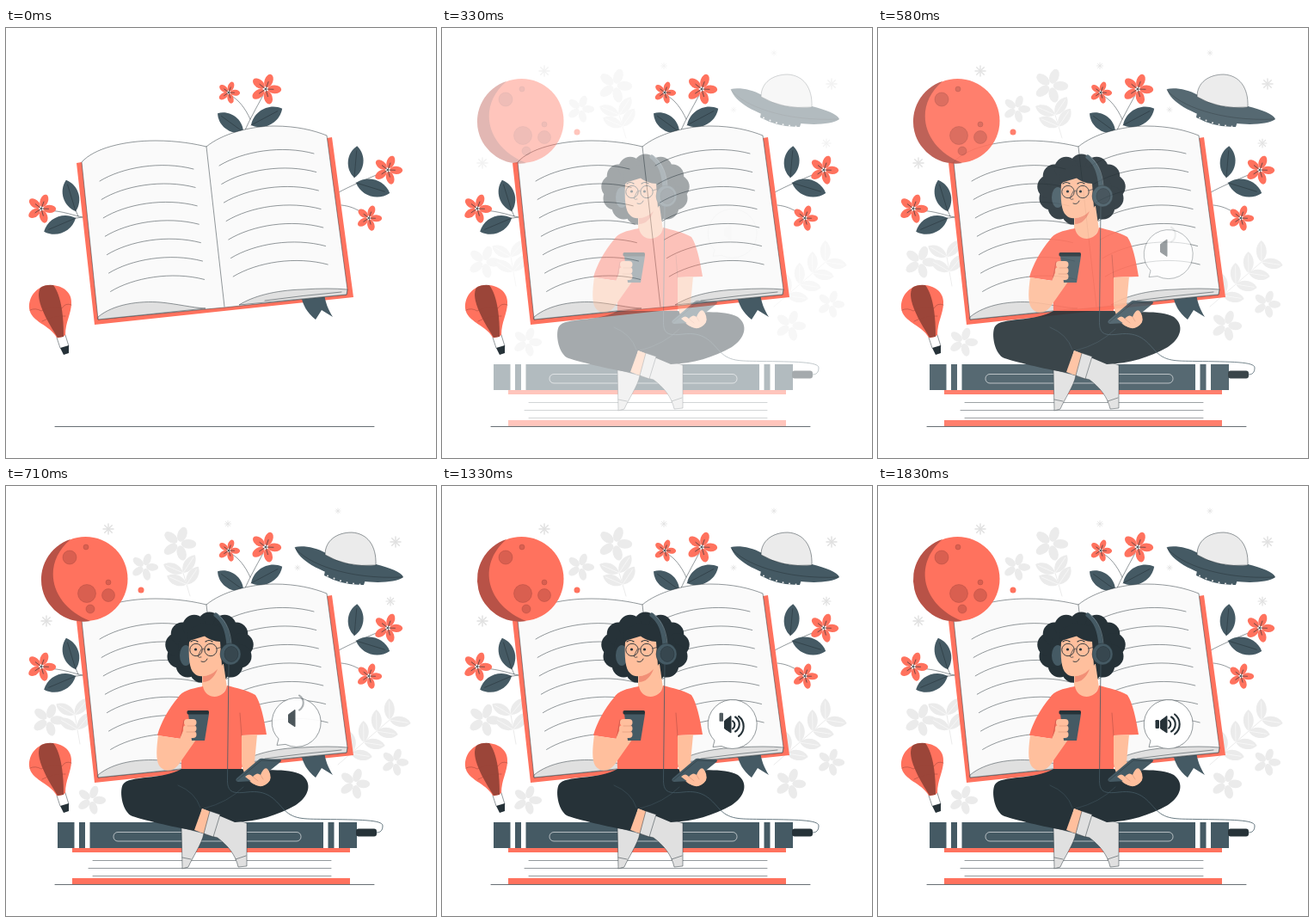
Animation, 500 px wide and 500 px high, one loop 1.87 s. Source, as an HTML page:

```html
<!DOCTYPE html>
<html lang="en">
<head>
<meta charset="utf-8">
<title>Reading and listening</title>
<style>
html, body { margin: 0; width: 100%; height: 100%; overflow: hidden; background: #fff; }
svg { display: block; width: 100vw; height: 100vh; }
</style>
</head>
<body>
<svg id="stage" viewBox="0 0 500 500"></svg>
<script>
const CORAL = '#ff725e', RUST = '#a84a40', SLATE = '#455a64', INK = '#263238', SKIN = '#ffbf9d', PALE = '#ebebeb', GREY = '#e0e0e0';

const path = (d, fill, extra = '') => `<path d="${d}" fill="${fill}" ${extra}/>`;
const line = (d, width = 0.5, color = INK) =>
  path(d, 'none', `stroke="${color}" stroke-width="${width}" stroke-linecap="round" stroke-linejoin="round"`);
const thin = `stroke="${INK}" stroke-width=".5"`;
const oval = (x, y, rx, ry, fill, extra = '') =>
  `<ellipse cx="${x}" cy="${y}" rx="${rx}" ry="${ry}" fill="${fill}" ${extra}/>`;
const dot = (x, y, r, fill, extra) => oval(x, y, r, r, fill, extra);
const rect = (x, y, w, h, fill, r = 0, extra = '') =>
  `<rect x="${x}" y="${y}" width="${w}" height="${h}" rx="${r}" fill="${fill}" ${extra}/>`;
const group = (id, body) => `<g id="${id}" opacity="0">${body}</g>`;
const each = (list, draw) => list.map(item => draw(...item)).join('');
const repeat = (n, draw) => Array.from({ length: n }, (_, i) => draw(i)).join('');

function flower(x, y, r, fill, veined) {
  return `<g transform="translate(${x} ${y})">` + repeat(5, i => `<g transform="rotate(${20 + i * 72})">` +
    oval(0, -r * 0.57, r * 0.27, r * 0.44, fill) +
    (veined ? line(`M0 0V${-r * 0.5}`, 0.6) : '') + '</g>') + '</g>';
}

// A leaf of the given length, growing from (x, y) at an angle in degrees.
function leaf(x, y, length, angle, fill, vein) {
  const w = length * 0.32, a = length * 0.25, b = length * 0.75;
  return `<g transform="translate(${x} ${y}) rotate(${angle})">` +
    path(`M0 0C${a} ${w} ${b} ${w} ${length} 0C${b} ${-w} ${a} ${-w} 0 0Z`, fill) +
    line(`M0 0H${length * 0.85}`, 0.5, vein) + '</g>';
}

// Pairs of pale leaves along a straight stem.
function spray(x, y, tx, ty, pairs) {
  const angle = Math.atan2(ty - y, tx - x) * 180 / Math.PI;
  return line(`M${x} ${y}L${tx} ${ty}`, 1, PALE) + repeat(pairs, i => {
    const k = (i + 1) / pairs, px = x + (tx - x) * k, py = y + (ty - y) * k;
    return leaf(px, py, 25, angle - 50, PALE, '#fff') + leaf(px, py, 25, angle + 50, PALE, '#fff');
  });
}

function star(x, y, r) {
  return repeat(4, i => {
    const a = i * Math.PI / 4, c = Math.cos(a) * r, s = Math.sin(a) * r;
    return line(`M${x - c} ${y - s}L${x + c} ${y + s}`, r * 0.24, GREY);
  });
}

function plants() {
  return line('M277 121C284 105 290 95 299 78M284 106C278 93 271 84 261 78' +
      'M387 191C398 185 420 175 438 168M390 206C400 207 407 210 416 216' +
      'M89 220C78 218 68 213 48 212M81 212L84 219M75 222L89 220') +
    each([[276, 121, 37, -144], [285, 113, 41, -28], [405, 174, 37, -85],
      [407, 180, 41, 17], [81, 213, 38, -107], [81, 221, 40, 157]], (...p) => leaf(...p, SLATE, INK)) +
    each([[302, 71, 18], [259, 75, 13], [41, 210, 17], [444, 165, 17], [422, 221, 15]],
      (...p) => flower(...p, CORAL, true));
}

function paleGarden() {
  return each([[201, 67, 20], [161, 94, 16], [49, 272, 19], [99, 365, 17], [405, 346, 18], [452, 321, 16]],
      (...p) => flower(...p, PALE, false)) +
    spray(214, 128, 206, 101, 2) + spray(86, 300, 80, 266, 2) + spray(386, 324, 446, 272, 4);
}

function openBook() {
  return path('M82 157L88 156L373 128L379 127L404 313L103 345Z', CORAL) +
    path('M343 311L370 308C371 319 375 328 380 336L367 328L360 339C350 331 345 322 343 311Z', SLATE) +
    path('M88 156C102 140 137 131 174 131C200 131 221 135 233 138C251 123 284 114 312 114C338 114 358 119 373 125L397 304L396 310L254 325L232 327L107 339Z', '#fafafa', thin) +
    path('M107 336C125 321 155 317 180 319C200 321 215 325 232 326L107 339Z', GREY, thin) +
    path('M271 322C287 312 312 305 345 304Q375 302 397 304L396 310Z', GREY, thin) +
    line('M301 317Q345 311 390 307M233 138L254 324') +
    repeat(7, i => line(`M${109 + 2.1 * i} ${178 + 21.4 * i}c26-16 71-24 109-14` +
      `M${248 + 2.7 * i} ${160 + 21.5 * i}c28-17 73-24 110-14`));
}

function balloon() {
  return path('M27 326C26 312 36 300 50 299C65 298 77 307 76 320C76 332 69 342 69 357Q64 361 59 360C51 345 29 342 27 326Z', CORAL) +
    path('M40 302C34 312 42 332 60 360L67 359C67 338 65 312 55 299Q46 298 40 302Z', '#9b4539') +
    line('M28 328Q34 325 41 329Q53 322 65 326Q69 319 76 322M42 341Q55 334 69 335', 0.5, '#9b4539') +
    line('M59 360L63 372M69 357L73 370') +
    path('M63 372L73 369L73 378L67 380Z', INK);
}

function sky() {
  return each([[119, 50, 6], [47, 157, 6], [258, 44, 3.5], [386, 29, 3], [453, 65, 6], [447, 134, 5], [339, 95, 3]], star) +
    dot(92.5, 108, 49, CORAL) +
    path('M75 62A49 49 0 0 0 98 157C52 139 40 92 75 62Z', '#b85247') +
    each([[74, 83, 8], [93, 71, 3], [94, 125, 10.5], [119, 127, 7.5], [98, 143, 5], [119, 112, 3]],
      (x, y, r) => dot(x, y, r, '#d95f50', `stroke="${RUST}" stroke-width=".4"`)) +
    dot(157, 121, 3.5, CORAL);
}

function saucer() {
  return path('M371 98L370 104Q392 116 416 115L418 109Z', SLATE) +
    path('M336 71C345 69 360 71 372 78C388 91 410 94 430 91C446 95 460 100 462 106C451 114 420 113 395 108C365 99 340 87 336 71Z', SLATE) +
    path('M371 80C371 63 385 54 402 54C420 55 431 69 430 92Q396 95 371 80Z', PALE, thin) +
    line('M336 72C350 90 397 109 461 106') +
    repeat(6, i => dot(374 + 7.5 * i, 104.5 + 3.4 * i - 0.28 * i * i, 1, PALE));
}

function closedBooks() {
  return rect(77, 421, 323, 42, CORAL) + rect(77, 426, 323.5, 30, '#fff') +
    repeat(3, i => line(`M${101 - 5 * (i % 2)} ${435.5 + 9 * i}H378`)) +
    rect(60, 391, 348, 30, SLATE) +
    repeat(4, i => rect(79.5 + 12.5 * (i % 2) + 289.5 * (i >> 1), 391, 5.5, 30, '#fff')) +
    rect(125, 402.5, 218, 10.5, 'none', 5, 'stroke="#fff" stroke-width=".6"') +
    rect(407, 398.5, 24, 9, INK, 3);
}

function head() {
  const curls = repeat(13, i => {
    const a = i * Math.PI * 2 / 13 - Math.PI / 2;
    return dot(236.5 + 38 * Math.cos(a), 188 + 28 * Math.sin(a), 13.5, INK);
  });
  return curls + oval(236, 188, 36, 28, INK) + oval(209, 197, 7, 12, SLATE) +
    path('M228 208V235Q239 262 257 235L253 207Z', SKIN) +
    path('M229 221Q238 221 246 213Q240 228 229 228Z', '#f28f76') +
    path('M213 180C212 199 213 213 219 218C224 223 232 222 240 217L251 209V178L236 173Z', SKIN) +
    path('M211 185C215 177 222 173 228 172C234 178 243 181 249 181L251 209L260 192L253 164L226 159L212 170Z', INK) +
    repeat(2, i => dot(221 + 17 * i, 190.5, 7.2, 'none', `stroke="${INK}" stroke-width=".9"`) +
      dot(220.5 + 15 * i, 190, 1.6, INK) + line(`M${215 + 17 * i} 181q4-3 8 0`, 1.2)) +
    line('M228 190Q229.5 188 231 190M245 189L255 186M227 190L223 198Q224 200 227 199', 0.7) +
    line('M227 204Q232 206 234 201', 0.9);
}

function body() {
  const shirt = path('M229 233C214 236 205 238 200 246C189 259 180 275 176 290L203 294L204 330H274V290L303 289C300 270 296 252 290 243C280 237 268 235 257 232C255 248 232 250 229 233Z', CORAL) +
    line('M203 294L207 272M274 291L272 264', 0.5, RUST);
  const forearm = path('M177 290C175 304 174 318 178 325C184 334 196 332 202 322L221 295L208 280L200 299L203 294Z', SKIN);
  const legs = path('M204 397L230 404C228 416 216 433 212 443L205 445Z', GREY, thin) +
    path('M237 378L248 381L280 392V442L270 443C267 429 258 418 246 409L231 405Z', GREY, thin) +
    path('M204 329H274C294 332 328 327 344 336C357 346 352 361 337 371C316 383 292 390 266 391L228 375L221 401C190 396 160 388 147 384C136 380 131 356 136 347C143 336 182 342 204 329Z', INK) +
    path('M228 375L239 379L230 404L219 400Z', SKIN) +
    path('M237 378L249 382L241 408L230 404Z', GREY, thin) +
    line('M200 348Q220 356 226 374M276 350Q258 368 230 375', 0.5, SLATE) +
    line('M205 432L215 434M267 434L279 430');
  const cup = path('M212 265H236L231 296H216Z', SLATE) + rect(210.5, 261, 25.5, 4.5, INK, 1.5) +
    repeat(3, i => rect(207 - i, 271 + 7 * i, 14.5 + i, 8, SKIN, 4)) +
    line('M211 279H221M210 286H221', 0.4, '#c67d63');
  const phoneHand = path('M274 290V323C277 340 288 353 302 347C310 343 308 334 302 330L289 321L292 289Z', SKIN) +
    path('M268 340L294 318Q296 316 300 317L319 318Q321 319 319 321L293 342Q291 344 287 343L270 344Q266 343 268 340Z', SLATE) +
    line('M269 342L297 319L319 320') +
    path('M278 338Q283 333 287 338Q292 332 296 336Q300 326 304 329Q309 335 307 342Q300 352 291 348Z', SKIN) +
    line('M287 338L293 343M296 336L299 341', 0.4, '#c67d63');
  return shirt + forearm + legs + phoneHand + cup;
}

function headphones() {
  return line('M244 150C254 157 258 169 259 186', 5, SLATE) +
    line('M247 150C257 158 261 170 262 184', 0.5, '#90a4ae') +
    oval(261, 195.5, 12, 12.5, SLATE, thin) + oval(262, 195.5, 8, 9, '#37474f', thin) +
    line('M259 207L257.5 340C257 356 263 358 280 356C304 353 312 364 322 375C334 388 345 387 370 387.5C410 388 438 388 438 395C438 401 435 403 431 403', 0.8, SLATE);
}

const wave = (x, h, r) => line(`M${x} ${277 - h}A${r} ${r} 0 0 1 ${x} ${277 + h}`, 2.1);
const drops = [
  ['bubble', 245, path('M311 287A28.5 28.5 0 1 1 325 302.5L315 303.5L317 296A28 28 0 0 1 311 287Z', '#fff', thin)],
  ['cone', 310, path('M328.5 273L336 267.5V287L328.5 282Z', INK, `stroke="${INK}" stroke-linejoin="round"`)],
  ['middleWave', 470, wave(341, 8.5, 10)],
  ['outerWave', 680, wave(345, 11.5, 14.5)],
  ['innerWave', 810, wave(338, 4.5, 5.5)],
  ['magnet', 940, rect(322.5, 272, 4.5, 10, INK, 1.2)]
];

document.getElementById('stage').innerHTML =
  line('M57 463.5H428', 0.7) + group('garden', paleGarden()) + plants() + openBook() + balloon() +
  group('scene', sky() + saucer() + closedBooks() + head() + body() + headphones()) +
  drops.map(([id, , shape]) => group(id, shape)).join('');

const LOOP = 1870, DROP = 740, HEIGHT = 40;
const clamp = v => Math.min(1, Math.max(0, v));
const cubic = (a, b, s) => 3 * (1 - s) ** 2 * s * a + 3 * (1 - s) * s * s * b + s ** 3;

// Cubic Bézier ease with a small overshoot, solved by bisection.
function settle(x) {
  let lo = 0, hi = 1;
  for (let i = 0; i < 24; i++) {
    const mid = (lo + hi) / 2;
    if (cubic(0.36, 0.5, mid) < x) lo = mid; else hi = mid;
  }
  return cubic(-0.01, 1.38, hi);
}

const setAttr = (id, name, value) => document.getElementById(id).setAttribute(name, value);

function draw() {
  const t = performance.now() % LOOP;
  const fade = (1 - Math.cos(Math.PI * clamp((t - 20) / 700))) / 2;
  setAttr('garden', 'opacity', fade);
  setAttr('scene', 'opacity', fade);
  for (const [id, start] of drops) {
    const e = settle(clamp((t - start) / DROP));
    setAttr(id, 'opacity', t > start ? clamp(e) : 0);
    setAttr(id, 'transform', `translate(0 ${(e - 1) * HEIGHT})`);
  }
  requestAnimationFrame(draw);
}
draw();
</script>
</body>
</html>
```
